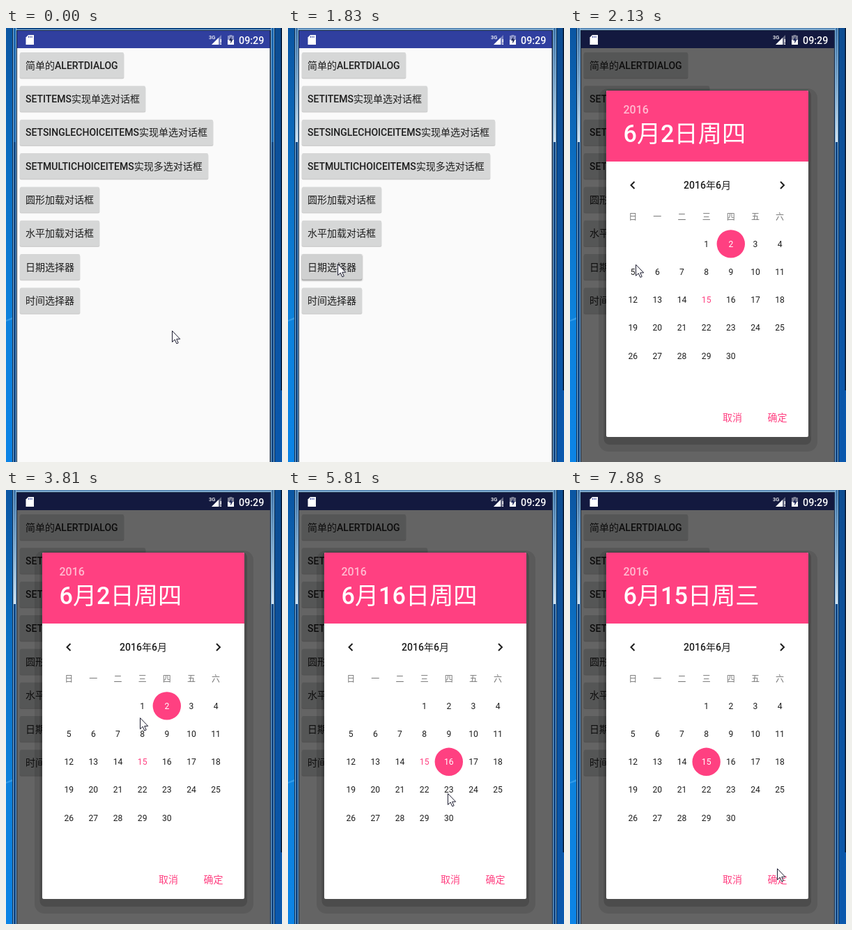
Write an HTML page that moves like this. It is 396 by 624 pixels and loops after 8000 ms.

```html
<!DOCTYPE html>
<html lang="zh">
<head>
<meta charset="utf-8">
<title>Date picker</title>
<style>
html, body { margin: 0; width: 100%; height: 100%; overflow: hidden; background: #0b5cab; }
svg { display: block; width: 100%; height: 100%; }
text { font-family: Roboto, "Noto Sans CJK SC", "Noto Sans CJK", sans-serif; }
.m { font-weight: 500; }
.c { text-anchor: middle; }
</style>
</head>
<body>
<svg id="stage" viewBox="0 0 396 624"></svg>
<script>
const LOOP = 8000, PINK = '#ff4081', INK = '#1e1e1e', WEEK = '日一二三四五六';
const stage = document.getElementById('stage');
const $ = id => document.getElementById(id);
const set = (id, attrs) => {
  for (const k in attrs) $(id).setAttribute(k, attrs[k]);
};

const rect = (x, y, w, h, fill, more = '') =>
  `<rect x="${x}" y="${y}" width="${w}" height="${h}" fill="${fill}" ${more}/>`;
const text = (x, y, size, fill, str, more = '') =>
  `<text x="${x}" y="${y}" font-size="${size}" fill="${fill}" ${more}>${str}</text>`;
const path = (d, more) => `<path d="${d}" ${more}/>`;
const grad = (id, ...colors) =>
  `<linearGradient id="${id}" x2="0" y2="1">` + colors.map((c, i) =>
    `<stop offset="${i / (colors.length - 1)}" stop-color="${c}"/>`).join('') + '</linearGradient>';

const labels = [
  '简单的ALERTDIALOG', 'SETITEMS实现单选对话框', 'SETSINGLECHOICEITEMS实现单选对话框',
  'SETMULTICHOICEITEMS实现多选对话框', '圆形加载对话框', '水平加载对话框', '日期选择器', '时间选择器'
];
const DATE_BUTTON = labels.indexOf('日期选择器');

// The month starts on a Wednesday
const cell = day => day + 2;
const colX = c => 90.2 + c * 35.15;
const dayPos = day => [colX(cell(day) % 7), 310.4 + Math.floor(cell(day) / 7) * 40.2];

function frameSide(x) {
  return rect(x, 0, 6, 164, '#1c67ae') + rect(x, 0, 6, 164, 'url(#glass)', 'class="glow"') +
    rect(x, 0, 1, 624, '#7fb2dc') + rect(x + 4, 0, 1, 624, '#7fb2dc');
}

function desktop() {
  return rect(0, 0, 9, 624, 'url(#sky)') + rect(386, 0, 10, 624, 'url(#skyDim)') +
    path('M0 420L9 416V419L0 422Z', 'fill="#58b4f5" opacity=".5"') +
    rect(394.5, 0, 1.5, 521, '#06152c') +
    rect(9, 0, 377, 624, '#0f4886') + frameSide(10) + frameSide(380) +
    rect(15, 0, 365, 2, '#5b8bb8', 'class="glow"') + rect(14, 2, 367, 1, '#9cc3e2') +
    rect(9, 0, 1, 624, '#0a2748') + rect(385, 0, 1, 624, '#0a2748') +
    rect(15, 3, 365, 621, '#14263f');
}

function statusIcons() {
  return path('M32 10H40V24H28.5V13.5Z', 'fill="#fff"') +
    path('M32.5 11.5V14M34.8 11.5V14M37.1 11.5V14', 'stroke="#303f9f"') +
    text(291, 16, 7.5, '#fff', '3G', 'class="m"') +
    path('M309 10V24H295Z', 'fill="#fff" opacity=".35"') +
    path('M305 14V24H295Z', 'fill="#fff"') +
    path('M308.3 16V21M308.3 22.3V24', 'stroke="#fff" stroke-width="1.4"') +
    path('M320.5 11V10H324.5V11H327V24H318V11Z', 'fill="#fff" opacity=".45"') +
    path('M318 17H327V24H318Z', 'fill="#fff"') +
    path('M323.5 12L320 18H322.3V22.5L325.6 16.3H323.4Z', 'fill="#1b2458"') +
    text(334, 22.5, 14.3, '#fff', '09:29', 'class="m"');
}

function button(label, i) {
  const y = 35 + i * 48.35;
  return rect(19.6, y + 1.2, 0, 37, '#000', `id="shade${i}" rx="2.5" opacity=".17"`) +
    rect(20, y, 0, 36.5, '#d6d7d7', `id="face${i}" rx="2"`) +
    text(28, y + 23.5, 14, INK, label, `id="label${i}" class="m"`);
}

// Each button is as wide as its label plus padding
function fitButton(i) {
  const width = Math.round($('label' + i).getComputedTextLength()) + 16;
  set('face' + i, { width });
  set('shade' + i, { width: width + .8 });
}

function dialog() {
  let s = rect(41, 87, 314, 522, '#000', 'rx="14" opacity=".1"') +
    rect(48.5, 89, 297.5, 510, '#000', 'rx="8" opacity=".16"') +
    rect(52, 90, 290, 498, '#fff', 'rx="2"') +
    path('M52 192V92Q52 90 54 90H340Q342 90 342 92V192Z', `fill="${PINK}"`) +
    text(76.5, 123, 16, '#ffb9cf', '2016', 'class="m"') +
    text(76.5, 164, 34.2, '#fff', '', 'id="title" class="m"') +
    path('M92.5 221L87.5 226L92.5 231M302 221L307 226L302 231',
      `fill="none" stroke="${INK}" stroke-width="2"`) +
    text(197, 231, 14, INK, '2016年6月', 'class="m c"') +
    [...WEEK].map((d, c) => text(colX(c), 276, 12, '#757575', d, 'class="c"')).join('') +
    '<circle id="ripple" r="20.2" fill="#e0e0e0"/>' +
    `<circle id="mark" r="20.2" fill="${PINK}"/>`;
  for (let d = 1; d <= 30; d++) {
    const [x, y] = dayPos(d);
    s += text(x, y + 4.4, 12.1, INK, d, `class="c" id="day${d}"`);
  }
  return s + text(219, 565, 14, PINK, '取消', 'class="m"') +
    text(283.5, 565, 14, PINK, '确定', 'class="m"');
}

stage.innerHTML =
  '<defs>' + grad('sky', '#0b56a2', '#0c70c4', '#0d82dc', '#0c84e6') +
  grad('skyDim', '#0d4d92', '#0a58ad') + grad('glass', '#3d73a8', '#7fa8cb', '#d3e2ee') + '</defs>' +
  desktop() +
  rect(16, 4, 362.5, 25, '#303f9f') + rect(16, 29, 362.5, 595, '#fafafa') +
  labels.map(button).join('') +
  rect(16, 4, 362.5, 620, '#000', 'id="dim"') +
  statusIcons() +
  `<g id="dialog">${dialog()}</g>` +
  '<circle id="touch" r="11" fill="#fff" fill-opacity=".65" stroke="#aeb2d6" stroke-opacity=".7" stroke-width="1.5"/>' +
  path('M.5 .5V16.5L4.2 13L6.8 18.8L9.2 17.8L6.7 12.2H11.7Z',
    'id="cursor" fill="#fff" stroke="#1c1c30" stroke-linejoin="round"');
labels.forEach((_, i) => fitButton(i));

// Pointer stops; the pointer glides straight from one to the next
const stops = [
  { at: 300, x: 238, y: 435 }, { at: 1130, x: 60, y: 342 },
  { at: 1830, x: 71, y: 339 }, { at: 2130, x: 94, y: 340 },
  { at: 2490, x: 110, y: 239 }, { at: 3030, x: 345, y: 165 },
  { at: 3550, x: 35, y: 124 }, { at: 3810, x: 192, y: 327 },
  { at: 4620, x: 200, y: 490 }, { at: 5300, x: 230, y: 396 },
  { at: 5810, x: 229, y: 436 }, { at: 6200, x: 196, y: 432 },
  { at: 6830, x: 195, y: 402 }, { at: 6960, x: 195, y: 402 },
  { at: 7880, x: 297, y: 544 }
];
function pointer(t) {
  const i = stops.findIndex(s => s.at > t);
  if (i < 1) return stops.at(i);
  const a = stops[i - 1], b = stops[i], p = (t - a.at) / (b.at - a.at);
  return { x: a.x + (b.x - a.x) * p, y: a.y + (b.y - a.y) * p };
}

// A tap shows a dot for TOUCH ms and selects its day after PICK ms
const TOUCH = 220, PICK = 125, PRESS = 1560, OPEN = 1980;
const taps = [{ at: 0, day: 2 }, { at: 5230, day: 16 }, { at: 6190, day: 22 }, { at: 6825, day: 15 }];

function draw(t) {
  const { x, y } = pointer(t);
  set('cursor', { transform: `translate(${x} ${y})` });

  const shown = t < OPEN ? 0 : t < OPEN + 150 ? .5 : 1;
  set('dim', { opacity: .6 * shown });
  set('dialog', { opacity: shown });
  document.querySelectorAll('.glow').forEach(g => g.setAttribute('opacity', t < PRESS ? 0 : 1));
  const pressed = t >= PRESS && t < OPEN + 150;
  set('face' + DATE_BUTTON, { fill: pressed ? '#d0d1d1' : '#d6d7d7' });
  set('shade' + DATE_BUTTON, { opacity: pressed ? .3 : .17, 'stroke-width': pressed ? 3 : 0, stroke: '#0004' });

  const tap = taps.findLast(p => p.at <= t);
  const { day } = taps.findLast(p => p.at + PICK <= t) || taps[0];
  const [cx, cy] = dayPos(day);
  set('mark', { cx, cy });
  for (let d = 1; d <= 30; d++)
    set('day' + d, { fill: d === day ? '#fff' : d === 15 ? PINK : INK });
  $('title').textContent = `6月${day}日周${WEEK[cell(day) % 7]}`;

  const [rx, ry] = dayPos(tap.day);
  set('ripple', { cx: rx, cy: ry, opacity: tap.day === day ? 0 : 1 });
  const touching = [PRESS, ...taps.slice(1).map(p => p.at)].some(at => t >= at && t < at + TOUCH);
  set('touch', { cx: x, cy: y, opacity: touching ? 1 : 0 });
}

const start = performance.now();
function tick() {
  draw((performance.now() - start) % LOOP);
  requestAnimationFrame(tick);
}
tick();
</script>
</body>
</html>
```
